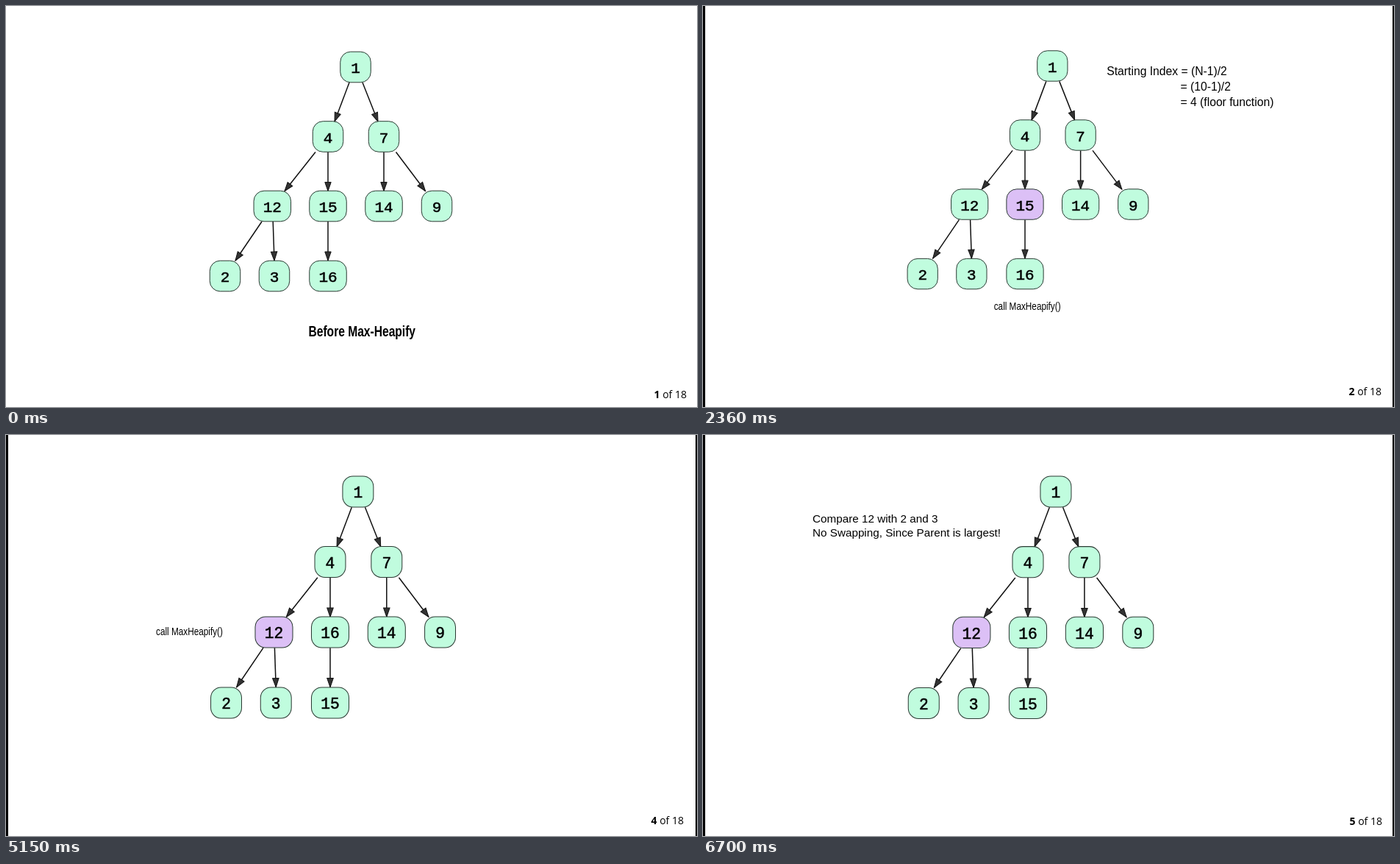
Animation of 940x545 px, one loop 8000 ms. Source, as an HTML page:

```html
<!DOCTYPE html>
<html lang="en">
<head>
<meta charset="utf-8">
<title>Max-Heapify</title>
<style>
  html, body { margin: 0; width: 100%; height: 100%; overflow: hidden; background: #fff; }
  svg { display: block; width: 940px; height: 545px; }
  .slide { display: none; }
  .slide.on { display: inline; }
  .node { stroke: #2b3a33; stroke-width: 1; }
  .edge { stroke: #111; stroke-width: 1.5; }
  .head { fill: #333; stroke: #111; }
  .key { font: 21px "Liberation Mono", monospace; text-anchor: middle; stroke: #000; stroke-width: .5; }
  .note { font-family: "Liberation Sans", Arial, sans-serif; }
  .page { font: 14px "Open Sans", "Noto Sans", sans-serif; text-anchor: end; }
  .page tspan { font-weight: 700; }
</style>
</head>
<body>
<svg id="stage" viewBox="0 0 940 545"></svg>
<script>
const GREEN = '#c0fcde', PURPLE = '#dcc0f6', SWAP = '#c4a0f9';
const LOOP = 8000;

// Heap order: centre of each node
const nodes = [[475.5, 83], [438, 177.5], [514, 177.5], [362.3, 272], [438, 272],
  [514, 272], [586, 272], [298, 367], [365, 367], [438, 367]];

// Parent-to-child lines: x at the top, x at the tip, depth of the parent
const edges = [[467, 447, 0], [485, 506, 0], [421, 379, 1], [438, 438, 1], [514, 514, 1],
  [530.5, 570.5, 1], [348, 312, 2], [363.2, 365, 2], [438, 438, 2]];

const before = [1, 4, 7, 12, 15, 14, 9, 2, 3, 16];
const after = [1, 4, 7, 12, 16, 14, 9, 2, 3, 15];

// view: x, y, scale of the tree; notes: text, x, baseline, size, squeeze
const slides = [
  { start: 0, keys: before, marked: [], view: [0, 0, 1], page: [926, 533],
    notes: [['Before Max-Heapify', 411.5, 449, 20, .78, 700]] },
  { start: 500, keys: before, marked: [4], view: [2.2, -1.1, .995], page: [923, 529],
    notes: [['Starting Index = (N-1)/2', 549.3, 94, 15.7], ['= (10-1)/2', 649.5, 114.8, 15.7],
      ['= 4 (floor function)', 649.5, 135.5, 15.7], ['call MaxHeapify()', 395.7, 412.5, 15.5, .76]] },
  { start: 3600, keys: after, marked: [4, 9], view: [.1, .1, .993], page: [922, 529], swap: true,
    notes: [['Child > Parent', 520.3, 329.5, 15.2, .91], ['Parent Swapped!', 520.3, 350.5, 15.2, .77]] },
  { start: 5150, keys: after, marked: [3], view: [-1.6, -6.9, 1.0105], page: [922, 529],
    notes: [['call MaxHeapify()', 204, 272, 15.5, .76]] },
  { start: 6700, keys: after, marked: [3], view: [-1.4, -7, 1.0123], page: [924, 530],
    notes: [['Compare 12 with 2 and 3', 149, 119.3, 15.25],
      ['No Swapping, Since Parent is largest!', 149, 137.5, 15.25]] }
];

function add(parent, tag, attrs, text = '') {
  const el = document.createElementNS('http://www.w3.org/2000/svg', tag);
  for (const name in attrs) el.setAttribute(name, attrs[name]);
  el.textContent = text;
  return parent.appendChild(el);
}

function drawEdge(tree, [x1, x2, depth]) {
  const y1 = 104 + depth * 94.5, y2 = y1 + 53;
  const angle = Math.atan2(y2 - y1, x2 - x1) * 180 / Math.PI;
  add(tree, 'line', { class: 'edge', x1, y1, x2, y2 });
  add(tree, 'path', { class: 'head', d: 'M0 0L-12 -4.2V4.2Z',
    transform: `translate(${x2} ${y2}) rotate(${angle})` });
}

function drawNode(tree, [x, y], key, fill) {
  const width = key > 9 ? 50.5 : 41.5;
  add(tree, 'rect', { class: 'node', x: x - width / 2, y: y - 20.8, width, height: 41.6, rx: 14, fill });
  add(tree, 'text', { class: 'key', x, y: y + 8.3 }, key);
}

function drawSlide(slide, i) {
  const g = add(stage, 'g', { class: 'slide' });
  const [dx, dy, scale] = slide.view;
  const tree = add(g, 'g', { transform: `translate(${dx} ${dy}) scale(${scale})` });
  edges.forEach(edge => drawEdge(tree, edge));
  nodes.forEach((at, n) => drawNode(tree, at, slide.keys[n], slide.marked.includes(n) ? PURPLE : GREEN));

  for (const [text, x, y, size, squeeze = 1, weight = 400] of slide.notes)
    add(g, 'text', { class: 'note', 'font-size': size, 'font-weight': weight,
      transform: `translate(${x} ${y}) scale(${squeeze} 1)` }, text);

  if (slide.swap) {
    add(g, 'path', { d: 'M462 340.5C488 345 503 337 503 319C503 302 492 295 472 297',
      fill: 'none', stroke: SWAP, 'stroke-width': 4 });
    add(g, 'path', { d: 'M459 297L475 288.5L472 297L475 306.5Z', fill: SWAP });
  }
  if (i) {
    add(g, 'rect', { width: 3, height: 545 });
    add(g, 'rect', { x: 938, width: 2, height: 545 });
  }
  const page = add(g, 'text', { class: 'page', x: slide.page[0], y: slide.page[1] });
  add(page, 'tspan', {}, i + 1);
  page.append(' of 18');
  return g;
}

const stage = document.getElementById('stage');
const groups = slides.map(drawSlide);
const begin = performance.now();

function show(now) {
  const t = Math.max(0, now - begin) % LOOP;
  const current = slides.findLastIndex(slide => slide.start <= t);
  groups.forEach((g, i) => g.classList.toggle('on', i === current));
  requestAnimationFrame(show);
}
show(begin);
</script>
</body>
</html>
```
